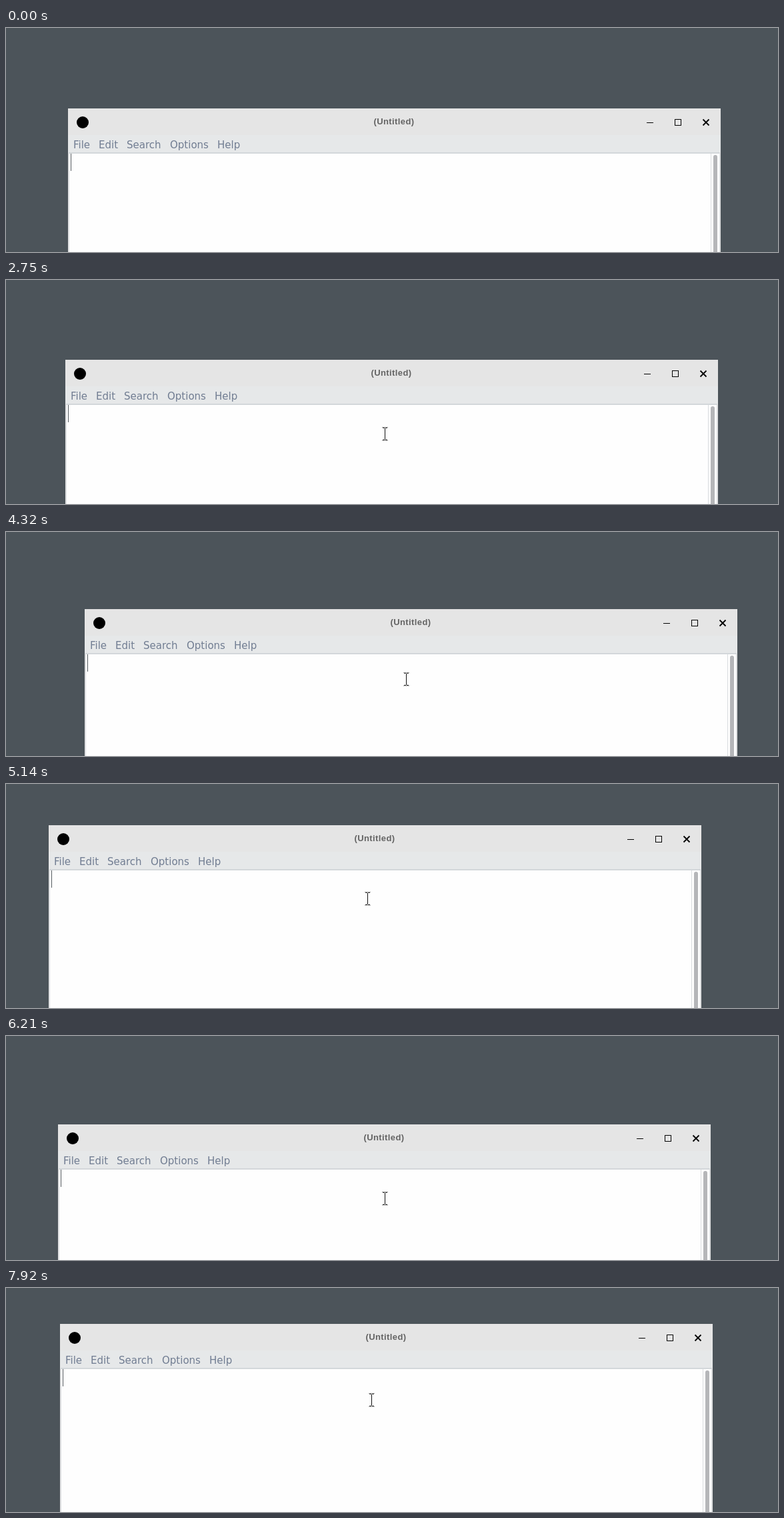
Recreate the animation shown at these times as an HTML page with a canvas. Size 1158 by 337 pixels, loop 8000 ms.

```html
<!DOCTYPE html>
<html lang="en">
<head>
<meta charset="utf-8">
<title>Dragging a window</title>
<style>
  html, body { margin: 0; width: 100%; height: 100%; overflow: hidden; background: #4c545a; }
  canvas { display: block; }
</style>
</head>
<body>
<canvas id="stage" width="1158" height="337"></canvas>
<script>
const ctx = document.getElementById('stage').getContext('2d');
const LOOP = 8000;
const REFRESH = 90;
const DRAG_START = 2550;
const DRAG_LAG = 70;
const GRIP = { x: 484, y: 110 };

// Key points as [time, x, y], joined by smooth curves.
const POINTER_PATH = [
  [120, 524, 350], [990, 538, 255], [1270, 542, 242], [1550, 542, 242], [2270, 577, 231]
];
const WINDOW_PATH = [
  [DRAG_START, 93, 121], [2700, 89, 120], [3320, 54, 134], [3700, 70, 150],
  [4320, 118, 116], [5130, 64, 62], [5700, 26, 91], [5930, 30, 115],
  [6210, 78, 133], [6810, 119, 128], [7380, 152, 85], [7620, 98, 53],
  [7920, 81, 54], [8050, 55, 60]
];

function slope(path, i, axis) {
  if (i === 0 || i === path.length - 1) return 0;
  const a = path[i - 1], b = path[i + 1];
  return (b[axis] - a[axis]) / (b[0] - a[0]);
}

function follow(path, time) {
  const last = path.length - 1;
  const t = Math.min(Math.max(time, path[0][0]), path[last][0]);
  const i = Math.max(0, path.findIndex(key => key[0] >= t) - 1);
  const a = path[i], b = path[i + 1], span = b[0] - a[0];
  const u = (t - a[0]) / span, v = 1 - u;
  const at = axis => Math.round(
    v * v * (1 + 2 * u) * a[axis] + u * u * (3 - 2 * u) * b[axis] +
    span * u * v * (v * slope(path, i, axis) - u * slope(path, i + 1, axis)));
  return { x: at(1), y: at(2) };
}

function rect(color, x, y, w, h) {
  ctx.fillStyle = color;
  ctx.fillRect(x, y, w, h);
}

function drawButtons() {
  rect('#000', 868, 21, 10, 1);
  ctx.strokeStyle = '#000';
  ctx.lineWidth = 1;
  ctx.strokeRect(910.5, 16.5, 9, 9);
  ctx.lineWidth = 1.8;
  ctx.beginPath();
  ctx.moveTo(952.5, 16.5);
  ctx.lineTo(961.5, 25.5);
  ctx.moveTo(961.5, 16.5);
  ctx.lineTo(952.5, 25.5);
  ctx.stroke();
}

function drawMenu() {
  ctx.font = '15px "DejaVu Sans", sans-serif';
  ctx.fillStyle = '#717d92';
  ctx.textAlign = 'left';
  let x = 8;
  for (const label of ['File', 'Edit', 'Search', 'Options', 'Help']) {
    ctx.fillText(label, x, 60);
    x += Math.round(ctx.measureText(label).width) + 13;
  }
}

function drawWindow({ x, y }) {
  ctx.save();
  ctx.translate(x, y);
  rect('#e5e5e5', 0, 0, 979, 400);
  rect('#e6e8e9', 0, 40, 979, 27);
  rect('#d3d7da', 1, 66, 977, 2);
  rect('#fefefe', 2, 68, 975, 332);
  for (const edge of [1, 964, 977]) rect('#d9dcdf', edge, 68, 1, 332);

  ctx.fillStyle = '#b5b6b9';
  ctx.beginPath();
  ctx.roundRect(968, 70, 6, 340, 3);
  ctx.fill();
  rect('#555b60', 4, 68, 1, 26);

  ctx.fillStyle = '#000';
  ctx.beginPath();
  ctx.arc(22, 21, 9, 0, Math.PI * 2);
  ctx.fill();

  ctx.font = 'bold 13px "Liberation Sans", Arial, sans-serif';
  ctx.letterSpacing = '0.4px';
  ctx.fillStyle = '#646464';
  ctx.textAlign = 'center';
  ctx.fillText('(Untitled)', 489, 24);
  ctx.letterSpacing = '0px';

  drawMenu();
  drawButtons();
  ctx.restore();
}

function drawPointer({ x, y }) {
  rect('#111', x - 1, y - 8, 1, 17);
  for (const side of [-1, 1]) {
    rect('#333', x - 4, y + side * 9, 3, 1);
    rect('#333', x, y + side * 9, 3, 1);
    rect('#aaa', x - 5, y + side * 10, 9, 1);
  }
}

function draw(time) {
  const now = Math.floor(time / REFRESH) * REFRESH;
  rect('#4c545a', 0, 0, 1158, 337);
  drawWindow(follow(WINDOW_PATH, now));
  if (now < DRAG_START) {
    drawPointer(follow(POINTER_PATH, now));
  } else {
    const ahead = follow(WINDOW_PATH, now + DRAG_LAG);
    drawPointer({ x: ahead.x + GRIP.x, y: ahead.y + GRIP.y });
  }
}

const began = performance.now();
function tick() {
  draw((performance.now() - began) % LOOP);
  requestAnimationFrame(tick);
}
tick();
</script>
</body>
</html>
```
